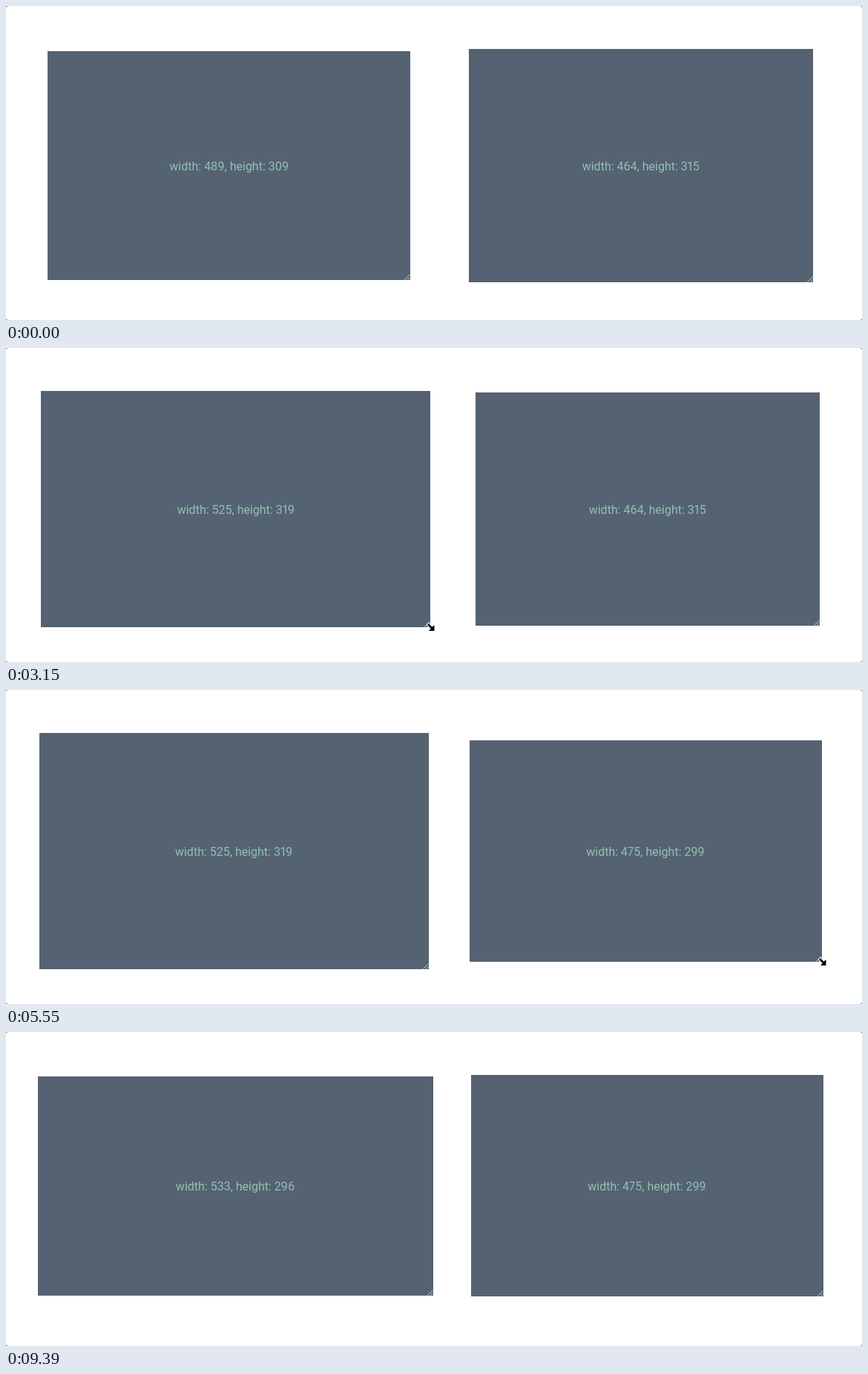
These frames come from a looping animation (1154x424 px, 9570 ms). An HTML page:

```html
<!DOCTYPE html>
<html lang="en">
<head>
<meta charset="utf-8">
<title>Resizable boxes</title>
<style>
  html, body { margin: 0; width: 100%; height: 100%; overflow: hidden; background: #fff; }
  #row {
    position: absolute; left: 17px; top: 58px; width: 1110px;
    display: flex; justify-content: space-around; align-items: center;
  }
  .box {
    position: relative; flex: none;
    display: flex; justify-content: center; align-items: center;
    background: #556272; color: #92c1b0;
    font: 16px Roboto, sans-serif; font-variant-numeric: proportional-nums; white-space: nowrap;
  }
  .box span { position: relative; top: 1px; }
  .box svg { position: absolute; right: 0; bottom: 0; }
  #overlay { position: absolute; left: 0; top: 0; }
</style>
</head>
<body>
<div id="row">
  <div class="box"><span></span><svg width="8" height="8"><path d="M.5 7.5l7-7M4.5 7.5l3-3" stroke="#c9d0d6"/></svg></div>
  <div class="box"><span></span><svg width="8" height="8"><path d="M.5 7.5l7-7M4.5 7.5l3-3" stroke="#c9d0d6"/></svg></div>
</div>
<svg id="overlay" width="1154" height="424">
  <path d="M0 0h2L0 2zM1154 0v2l-2-2zM0 424v-2l2 2zM1154 424h-2l2-2z" fill="#777"/>
  <g id="pointer">
    <g id="ring" fill="none">
      <circle r="16.5" stroke="#fff" stroke-width="5"/>
      <circle r="16.5" stroke="#000" stroke-width="3"/>
    </g>
    <path id="arrow" d="M0 0V16L3.7 12.6 6 18 8.6 17 6.3 11.5H11.5Z" stroke="#fff"/>
    <path id="resize" d="M-2-.2-.2-2 4.5 2.7 7.5 0V8H0L2.7 5Z" stroke="#fff" stroke-width="2" paint-order="stroke"/>
  </g>
</svg>
<script>
const LOOP = 9570, STEP = 30, LEAD = 60;

// Each drag eases through turning points: time, width, height.
const DRAGS = [
  { box: 0, press: 990, release: 3150,
    turns: [[1050, 489, 309], [1980, 577, 320], [2400, 416, 320], [3100, 525, 319]] },
  { box: 1, press: 3780, release: 5490,
    turns: [[4190, 464, 315], [4430, 340, 315], [5130, 513, 302], [5430, 475, 299]] },
  { box: 0, press: 6450, release: 8190,
    turns: [[6600, 525, 319], [7020, 562, 319], [7290, 480, 319], [7710, 548, 320], [8150, 533, 296]] },
];

// Free pointer moves; a number as an end stands for the grip of that box.
const REST = [558, 392];
const HOPS = [
  { start: 60, end: 960, from: [489, 398], to: 0, sag: 8 },
  { start: 3180, end: 3750, from: 0, to: 1, sag: 0 },
  { start: 5730, end: 6420, from: 1, to: 0, sag: 30 },
  { start: 8190, end: 8400, from: 0, to: REST, sag: 0 },
  { start: 9090, end: 9390, from: REST, to: [489, 402], sag: -21 },
];

const $ = id => document.getElementById(id);
const boxes = [...document.querySelectorAll('.box')];
const tracks = [0, 1].map(box => DRAGS.filter(d => d.box === box).flatMap(d => d.turns));
const show = (el, on) => el.style.display = on ? '' : 'none';
const progress = (t, start, end) => Math.min(Math.max((t - start) / (end - start), 0), 1);
const ease = u => (1 - Math.cos(Math.PI * u)) / 2;
const mix = (a, b, u) => a.map((v, i) => v + (b[i] - v) * u);

function sizeAt(t, box) {
  const track = tracks[box];
  const from = track.findLast(turn => turn[0] <= t) || track[0];
  const to = track.find(turn => turn[0] > t) || from;
  const u = from === to ? 0 : ease(progress(t, from[0], to[0]));
  return mix(from.slice(1), to.slice(1), u);
}

function gripAt(t, box) {
  const [[w1, h1], [w2, h2]] = [sizeAt(t, 0), sizeAt(t, 1)];
  const gap = (1110 - w1 - w2) / 4;
  const right = box ? 1127 - gap : 17 + gap + w1;
  const bottom = 58 + (Math.max(h1, h2) + (box ? h2 : h1)) / 2;
  return [right - 2, bottom - 3];
}

function pointerAt(t, drag) {
  // The box trails the pointer while it is being dragged.
  if (drag) return gripAt(t + LEAD, drag.box);
  const hop = HOPS.findLast(h => h.start <= t) || HOPS[0];
  const place = p => Array.isArray(p) ? p : gripAt(t, p);
  const u = ease(progress(t, hop.start, hop.end));
  const [x, y] = mix(place(hop.from), place(hop.to), u);
  return [x, y + hop.sag * Math.sin(Math.PI * u)];
}

function draw(now) {
  const t = Math.floor(now % LOOP / STEP) * STEP;
  boxes.forEach((box, i) => {
    const [w, h] = sizeAt(t, i).map(Math.round);
    box.style.width = w + 'px';
    box.style.height = h + 'px';
    box.firstChild.textContent = `width: ${w}, height: ${h}`;
  });
  const drag = DRAGS.find(d => t >= d.press && t < d.release);
  const [x, y] = pointerAt(t, drag);
  const onGrip = drag || [0, 1].some(box => {
    const [gx, gy] = gripAt(t, box);
    return Math.hypot(x - gx, y - gy) < 10;
  });
  show($('pointer'), t >= 60 && t < 9390);
  $('pointer').setAttribute('transform', `translate(${Math.round(x)} ${Math.round(y)})`);
  show($('ring'), drag);
  show($('resize'), onGrip);
  show($('arrow'), !onGrip);
}

const began = performance.now();
function tick() {
  draw(performance.now() - began);
  requestAnimationFrame(tick);
}
tick();
</script>
</body>
</html>
```
